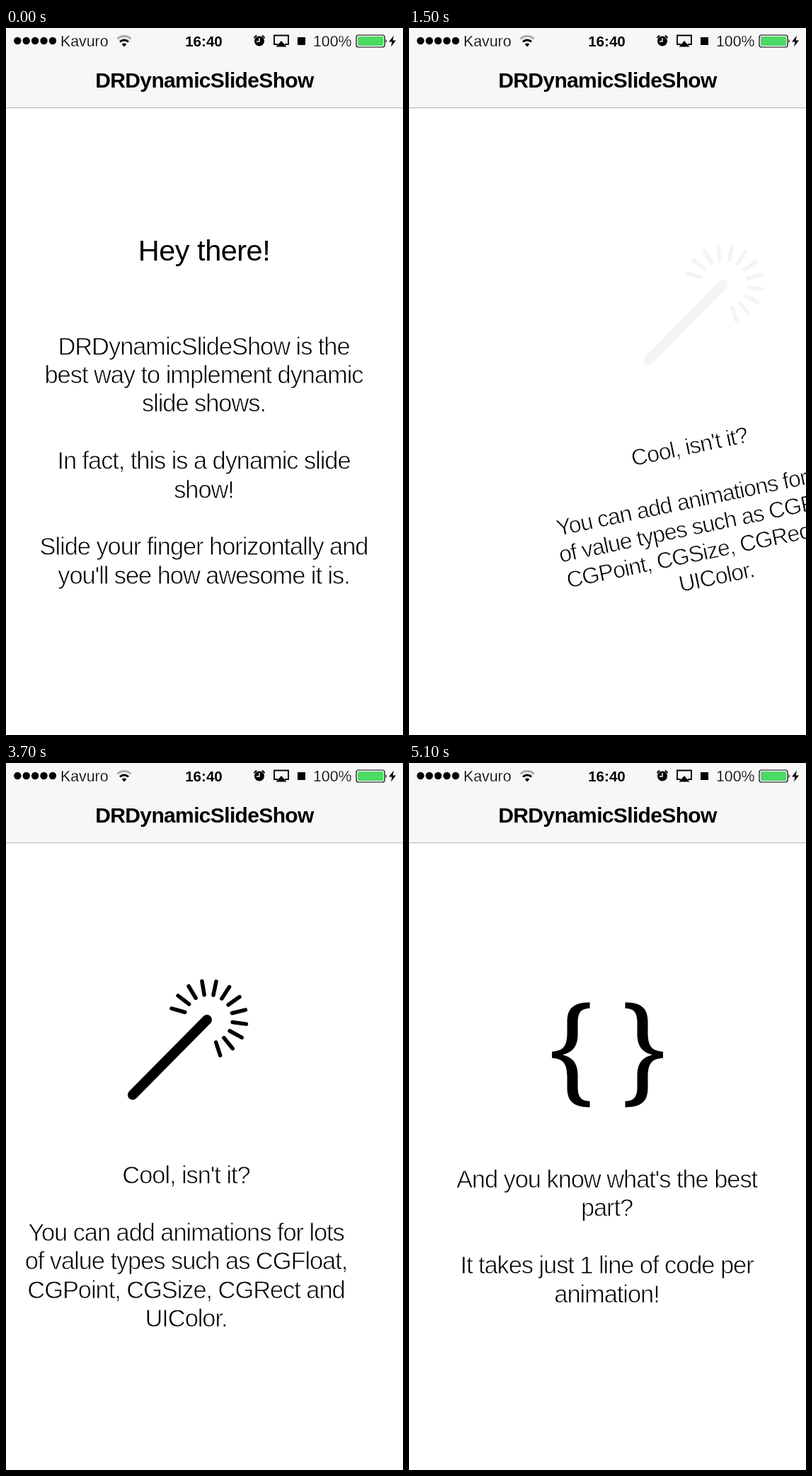
Write an HTML page that moves like this. It is 561 px wide and 997 px high and loops after 6.1 s.

```html
<!DOCTYPE html>
<html lang="en">
<head>
<meta charset="utf-8">
<title>DRDynamicSlideShow</title>
<style>
  html, body { margin: 0; width: 100%; height: 100%; overflow: hidden; background: #fff; }
  svg { display: block; }
  text { font-family: "Liberation Sans", Arial, sans-serif; }
  .mid { text-anchor: middle; }
  /* A white outline thins the letters to a light weight */
  .body text {
    font-size: 34.5px; letter-spacing: -1.08px; text-anchor: middle;
    stroke: #fff; stroke-width: 0.8px;
  }
  .status { font-size: 21.3px; stroke: #f7f7f7; stroke-width: 0.3px; }
  .bold { font-weight: bold; }
</style>
</head>
<body>
<svg width="561" height="997" viewBox="0 0 561 997">
  <text id="hello" class="mid" x="280" y="328" font-size="41.5" letter-spacing="-0.5">Hey there!</text>
  <g id="intro" class="body"></g>

  <g id="wand" stroke="#000" stroke-linecap="round">
    <path d="M204 468L309 362" stroke-width="14"/>
    <path id="rays" stroke-width="5.5"/>
  </g>
  <g id="cool" class="body"></g>

  <g id="code">
    <path id="brace" d="M255.5 337.5V346C243 346 239 352 238.5 364V384C238 400 231 408 217 411.5C231 415 238 423 238.5 439V459C239 471 243 476.5 255.5 477V485.5C232 485 224 477 223.5 459V441C223 424 218 417 202 416V407C218 406 223 399 223.5 382V364C224 346 232 338 255.5 337.5Z"/>
    <use href="#brace" transform="matrix(-1 0 0 1 561 0)"/>
    <g id="best" class="body"></g>
  </g>

  <rect width="561" height="112" fill="#f7f7f7"/>
  <rect y="112" width="561" height="1" fill="#b4b4b4"/>
  <text class="mid bold" x="280.5" y="84" font-size="30" letter-spacing="-0.65">DRDynamicSlideShow</text>

  <path d="M16.3 18h50" stroke="#000" stroke-width="10.4" stroke-linecap="round" stroke-dasharray="0 12.4"/>
  <text class="status" x="77" y="26">Kavuro</text>
  <g fill="none" stroke="#000" stroke-width="3">
    <path d="M157.5 15.5a13.5 13.5 0 0 1 19 0" stroke="#aaa"/>
    <path d="M161 19.5a8.5 8.5 0 0 1 12 0"/>
  </g>
  <path d="M167 26.5l-3.2-3.6a4.6 4.6 0 0 1 6.4 0z"/>
  <text class="mid bold" x="279.5" y="26" font-size="20.6">16:40</text>

  <circle cx="358" cy="18.5" r="7"/>
  <path d="M351 13.5l2.500-2.500M365 13.500l-2.500-2.500" stroke="#000" stroke-width="2" stroke-linecap="round"/>
  <path d="M358 14v5h-4" fill="none" stroke="#f7f7f7" stroke-width="1.5"/>
  <path d="M384 23h-5V10.500h20V23h-5" fill="none" stroke="#000" stroke-width="1.8"/>
  <path d="M381.500 26.500l7.500-8.500 7.500 8.500z"/>
  <rect x="412" y="13" width="11" height="11"/>
  <text class="status" x="434" y="26">100%</text>
  <rect x="495" y="10" width="40" height="17" rx="3" fill="none" stroke="#000" stroke-width="1.2"/>
  <rect x="497" y="12" width="36" height="13" rx="1.500" fill="#4cd964"/>
  <path d="M536.500 15.500q2.500 3 0 6z"/>
  <path d="M548 10.500l-7 9h4.500l-1.500 7 7-9h-4.500z"/>
</svg>
<script>
  const W = 561, H = 997, LOOP = 6100, STEP = 100;
  const LINE = 40.4, PIVOT_Y = 677, TILT = 0.9, FADE_FROM = 0.75;
  const $ = id => document.getElementById(id);

  // Scroll progress of each swipe, one value per step
  const swipes = [
    { start: 900, steps: [.01, .04, .1, .198, .36, .56, .76, .92, .979, .994, .998, 1] },
    { start: 3700, steps: [.0446, .13, .26, .43, .71, .92, .984, .997, .999, 1] }
  ];

  function addLines(id, baseline, copy) {
    copy.split("\n").forEach((line, i) => {
      const el = document.createElementNS("http://www.w3.org/2000/svg", "text");
      el.setAttribute("x", 279.5);
      el.setAttribute("y", baseline + i * LINE);
      el.textContent = line;
      $(id).append(el);
    });
  }

  addLines("intro", 460.5, `DRDynamicSlideShow is the
best way to implement dynamic
slide shows.

In fact, this is a dynamic slide
show!

Slide your finger horizontally and
you'll see how awesome it is.`);
  addLines("cool", 593, `Cool, isn't it?

You can add animations for lots
of value types such as CGFloat,
CGPoint, CGSize, CGRect and
UIColor.`);
  addLines("best", 599, `And you know what's the best
part?

It takes just 1 line of code per
animation!`);

  function ray(i) {
    const angle = (196 + i * 21.45) * Math.PI / 180;
    const at = r => `${311 + r * Math.cos(angle)} ${361 + r * Math.sin(angle)}`;
    return `M${at(34.5)}L${at(54)}`;
  }
  $("rays").setAttribute("d", Array.from({ length: 12 }, (_, i) => ray(i)).join(""));

  function progress({ start, steps }, t) {
    const i = Math.floor((t - start) / STEP);
    return i < 0 ? 0 : steps[Math.min(i, steps.length - 1)];
  }

  const move = (id, x, y) => $(id).setAttribute("transform", `translate(${x} ${y})`);
  const fade = (id, alpha) => $(id).setAttribute("opacity", alpha);

  function draw(t) {
    const [first, second] = swipes.map(s => progress(s, t));
    const left = 1 - first;
    const x = W * (left - second);

    move("hello", 0, -H * first);
    move("intro", 0, 2 * H * first);
    fade("intro", left);

    move("wand", x, 0);
    fade("wand", Math.max(0, (first - FADE_FROM) / (1 - FADE_FROM)));

    // The tilt blends matrix entries, so the text also shrinks a little
    const a = 1 - left * (1 - Math.cos(TILT));
    const b = left * Math.sin(TILT);
    $("cool").setAttribute("transform",
      `translate(${x + W / 2} ${PIVOT_Y}) matrix(${a} ${-b} ${b} ${a} 0 0) translate(${-W / 2} ${-PIVOT_Y})`);

    move("code", 0, 2 * H * (1 - second));
  }

  const begin = performance.now();
  function tick() {
    draw((performance.now() - begin) % LOOP);
    requestAnimationFrame(tick);
  }
  draw(0);
  requestAnimationFrame(tick);
</script>
</body>
</html>
```
